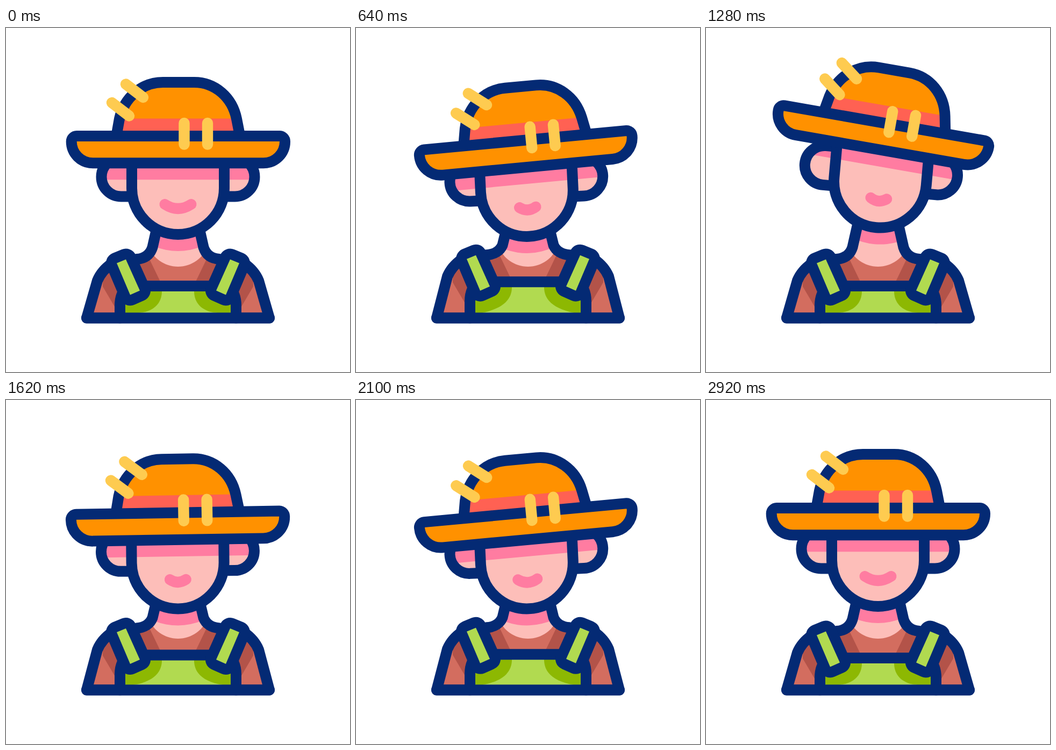
Recreate the animation shown at these times as an HTML page. Size 640x640 px, loop 3600 ms.

```html
<!DOCTYPE html>
<html lang="en">
<head>
<meta charset="utf-8">
<title>Farmer</title>
<style>
  html, body { margin: 0; width: 100%; height: 100%; overflow: hidden; background: #fff; }
  svg { display: block; width: 100vw; height: 100vh; }
  .line { fill: none; stroke: #042a74; stroke-width: 20; stroke-linejoin: round; stroke-linecap: round; }
  .strap { fill: #b1da50; stroke: #042a74; stroke-width: 40; stroke-linejoin: round; paint-order: stroke; }
  .straw { fill: none; stroke: #fecb50; stroke-width: 20.4; stroke-linecap: round; }
  .skin { fill: #fdbeb9; }
  .pink { fill: #ff7ca1; }
  .shirt { fill: #d36d5f; }
  .fold { fill: #b35349; }
  .bib { fill: #b1da50; }
  .leaf { fill: #8db802; }
  .orange { fill: #ff9100; }
  .band { fill: #ff6153; }
  .mouth { fill: none; stroke: #ff7ca1; stroke-width: 20; stroke-linecap: round; }
</style>
</head>
<body>
<svg viewBox="0 0 640 640">
  <defs>
    <path id="face" d="M234 215V298A86 86 0 0 0 406 298V215"/>
    <path id="ears" d="M234 313.5H214A36.5 36.5 0 0 1 214 240.5H234M406 313.5H426A36.5 36.5 0 0 0 426 240.5H406"/>
    <path id="neck" d="M284 355L270 412C272 426 294 444 320 444C346 444 368 426 370 412L356 355Z"/>
    <path id="crown" d="M206 197L211 169C220 129 253 101 292 101H350C389 101 421 129 429 169L434.5 197"/>
    <path id="brim" d="M131.5 201H509.5A10 10 0 0 1 519 211A40 40 0 0 1 479 251.3H162A40 40 0 0 1 121.7 211A10 10 0 0 1 131.5 201Z"/>
    <clipPath id="neckClip"><use href="#neck"/></clipPath>
    <clipPath id="headClip"><use href="#face"/><use href="#ears"/></clipPath>
    <clipPath id="crownClip"><use href="#crown"/></clipPath>
  </defs>

  <path class="shirt" data-shape="body"/>
  <path class="fold" data-shape="folds"/>
  <use href="#neck" class="skin"/>
  <g clip-path="url(#neckClip)"><circle class="pink" data-part="head" cx="320" cy="298" r="117"/></g>
  <path class="line" data-shape="body"/>
  <path class="bib" data-shape="bib"/>
  <path class="leaf" data-shape="leaves"/>
  <path class="line" data-shape="bib"/>
  <path class="line" d="M150 539.6H490"/>
  <g id="straps">
    <path class="strap" d="M206 437.5L223 430.5L249 488.5L231 496.5Z"/>
    <path class="strap" d="M434 437.5L417 430.5L391 488.5L409 496.5Z"/>
  </g>

  <g data-part="head">
    <use href="#ears" class="skin"/>
    <use href="#face" class="skin"/>
    <g clip-path="url(#headClip)">
      <rect class="pink" data-part="hat" x="80" y="180" width="480" height="102.3"/>
    </g>
    <path class="mouth" id="mouth"/>
    <use href="#ears" class="line"/>
    <use href="#face" class="line"/>
    <g data-part="hat">
      <use href="#crown" class="orange"/>
      <rect class="band" clip-path="url(#crownClip)" x="190" y="168.5" width="260" height="30"/>
      <use href="#crown" class="line"/>
      <use href="#brim" class="orange"/>
      <use href="#brim" class="line"/>
      <path class="straw" d="M223 104.5L255 129M197 139L229 163.5M331.5 177V216.5M375 177V216.5"/>
    </g>
  </g>
</svg>
<script>
  const LOOP = 3600;

  // [time in ms, value]
  const tracks = {
    drop: [[0, 0], [400, 9], [1180, -13.3], [1220, -13.3], [1780, 8.8], [1860, 8.8], [2380, -1], [2920, 0]],
    tilt: [[0, 0], [400, -2.68], [820, -2.68], [1180, 5], [1260, 5], [1820, -2.7], [2080, -2.7], [2420, 2.5], [2920, 0]],
    lift: [[0, 0], [740, -8.2], [800, -8.2], [1240, 0], [1850, -8], [1960, -8], [2500, 0]],
    pout: [[0, 0], [720, 1], [1840, 1], [2520, 0]]
  };

  const ease = x => x * x * (3 - 2 * x);

  function valueAt(steps, t) {
    const next = steps.findIndex(s => s[0] > t);
    if (next < 0) return steps[steps.length - 1][1];
    const [t0, a] = steps[next - 1], [t1, b] = steps[next];
    return a + (b - a) * ease((t - t0) / (t1 - t0));
  }

  const all = sel => document.querySelectorAll(sel);
  const setAll = (sel, name, value) => all(sel).forEach(el => el.setAttribute(name, value));

  // The hem stays put while everything above it rises by b.
  const shapes = {
    body: b => `M150 539.6L170 ${470 + b}C175 ${458 + b} 184 ${447 + b} 197 ${438 + b}L243 ${430 + b}
      C258 ${429 + b} 268 ${422 + b} 272.5 ${408 + b / 2}L284.5 355H355.5L367.5 ${408 + b / 2}
      C372 ${422 + b} 382 ${429 + b} 397 ${430 + b}L443 ${438 + b}
      C456 ${447 + b} 465 ${458 + b} 470 ${470 + b}L490 539.6Z`,
    folds: b => `M196 ${446 + b}L212 ${492 + b}L203 ${520 + b}L180 ${481 + b}V${460 + b}Z
      M444 ${446 + b}L428 ${492 + b}L437 ${520 + b}L460 ${481 + b}V${460 + b}Z
      M264 ${424 + b}L240 ${440 + b}L262 ${480 + b}H291Z
      M376 ${424 + b}L400 ${440 + b}L378 ${480 + b}H349Z`,
    bib: b => `M212 539.6V${516 + b}Q212 ${492 + b} 228 ${480 + b}H412Q428 ${492 + b} 428 ${516 + b}V539.6`,
    leaves: b => `M290 ${480 + b}V${490 + b}C290 ${514 + b} 272 ${530 + b} ${242 + b} 530H212V${505 + b}L240 ${480 + b}Z
      M350 ${480 + b}V${490 + b}C350 ${514 + b} 368 ${530 + b} ${398 - b} 530H428V${505 + b}L400 ${480 + b}Z`
  };

  function mouthPath(k) {
    const half = 24.5 - 9.5 * k, y = 328 + 1.5 * k, dip = 344 - 4.5 * k;
    return `M${320 - half} ${y}Q320 ${dip} ${320 + half} ${y}`;
  }

  function draw(t) {
    const drop = valueAt(tracks.drop, t), tilt = valueAt(tracks.tilt, t);
    const lift = valueAt(tracks.lift, t), pout = valueAt(tracks.pout, t);
    setAll('[data-part=head]', 'transform', `translate(0 ${drop}) rotate(${tilt} 320 345)`);
    setAll('[data-part=hat]', 'transform', `translate(0 ${drop * 0.95}) rotate(${tilt} 320 180)`);
    setAll('#straps', 'transform', `translate(0 ${lift})`);
    setAll('#mouth', 'd', mouthPath(pout));
    for (const name in shapes) setAll(`[data-shape=${name}]`, 'd', shapes[name](lift));
  }

  const start = performance.now();
  function tick() {
    draw((performance.now() - start) % LOOP);
    requestAnimationFrame(tick);
  }
  tick();
</script>
</body>
</html>
```
